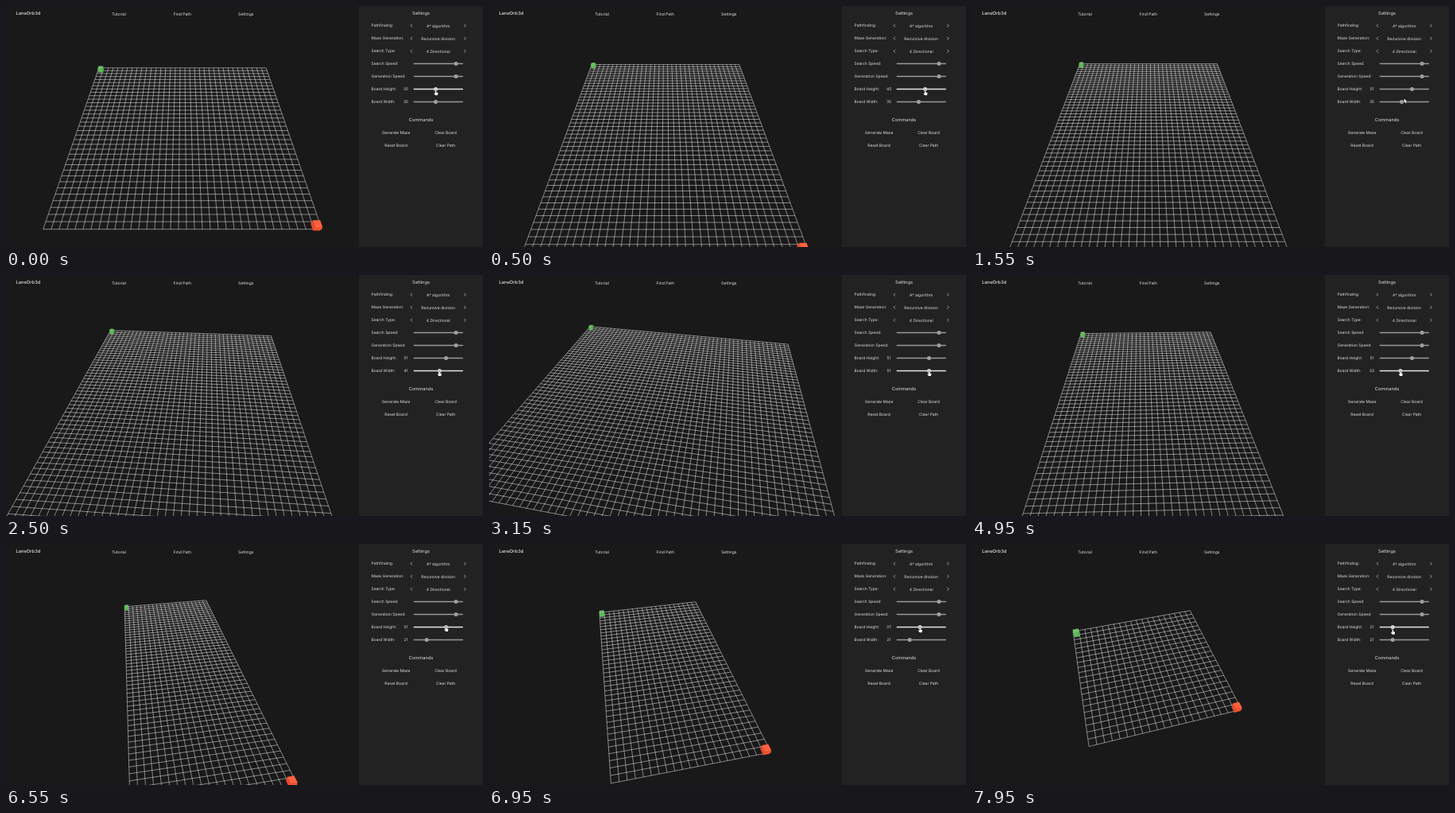
These frames come from a looping animation (600x303 px, 8 s). An HTML page with a canvas:

```html
<!DOCTYPE html>
<html lang="en">
<head>
<meta charset="utf-8">
<title>Path board</title>
<style>
  html, body { margin: 0; width: 100%; height: 100%; overflow: hidden; background: #191919; }
  canvas { display: block; width: 600px; height: 303px; }
</style>
</head>
<body>
<canvas id="stage"></canvas>
<script>
const LOOP = 8000, STEP = 50;
const STAGE = { w: 600, h: 303 }, PANEL_X = 444;
const VIEW = { x: 222, y: 153.9, focalX: 366, focalY: 368.5 };
const EYE_HEIGHT = 35;

// Keyframes: [time, value...]
const HEIGHT_KEYS = [[0, 35], [800, 51], [6550, 51], [6950, 37], [7350, 31], [7900, 21]];
const WIDTH_KEYS = [[2200, 35], [3050, 50.4], [3150, 51], [4400, 51], [4950, 33], [5250, 25], [5650, 21]];
const MOVES = [
  [[1200, 553, 105], [1550, 543.6, 116.4], [1800, 540.5, 120.4]],
  [[5800, 529, 120.4], [6100, 543, 112], [6300, 552, 103.4]]
];

const canvas = document.getElementById('stage');
const ctx = canvas.getContext('2d');
const dpr = window.devicePixelRatio || 1;
canvas.width = STAGE.w * dpr;
canvas.height = STAGE.h * dpr;

function sample(keys, t) {
  if (t <= keys[0][0]) return keys[0].slice(1);
  for (let i = 1; i < keys.length; i++) {
    const a = keys[i - 1], b = keys[i];
    if (t <= b[0]) {
      const k = (t - a[0]) / (b[0] - a[0]);
      return a.slice(1).map((v, j) => v + (b[j + 1] - v) * k);
    }
  }
  return keys[keys.length - 1].slice(1);
}

const odd = v => Math.round((v - 1) / 2) * 2 + 1;
const knobX = v => 540.5 + (v - 35) * 0.8125;

// The camera looks at the board's centre from above its near side.
function makeCamera(cols, rows) {
  const ex = (cols - 35) / 2, ez = rows / 2 + 16.4;
  const dist = Math.hypot(ex, ez), range = Math.hypot(dist, EYE_HEIGHT);
  const fx = -ex / dist, fz = -ez / dist;
  const cos = dist / range, sin = EYE_HEIGHT / range;
  return (x, y, z) => {
    const dx = x - ex, dy = y - EYE_HEIGHT, dz = z - ez;
    const ahead = dx * fx + dz * fz, side = -dx * fz + dz * fx;
    const depth = ahead * cos - dy * sin, up = ahead * sin + dy * cos;
    return [VIEW.x + side * VIEW.focalX / depth, VIEW.y - up * VIEW.focalY / depth];
  };
}

function drawGrid(project, cols, rows) {
  const hx = cols / 2, hz = rows / 2;
  ctx.beginPath();
  for (let i = 0; i <= cols; i++) {
    ctx.moveTo(...project(i - hx, 0, -hz));
    ctx.lineTo(...project(i - hx, 0, hz));
  }
  for (let j = 0; j <= rows; j++) {
    ctx.moveTo(...project(-hx, 0, j - hz));
    ctx.lineTo(...project(hx, 0, j - hz));
  }
  ctx.strokeStyle = 'rgba(255,255,255,0.76)';
  ctx.lineWidth = 0.62;
  ctx.stroke();
}

function drawCube(project, cx, cz, [top, front, side]) {
  const h = 0.45;
  const face = (color, corners) => {
    const p = corners.map(([x, y, z]) => project(cx + x * h, y * h, cz + z * h));
    const turn = (p[1][0] - p[0][0]) * (p[2][1] - p[0][1]) - (p[1][1] - p[0][1]) * (p[2][0] - p[0][0]);
    if (turn <= 0) return;
    ctx.beginPath();
    p.forEach(q => ctx.lineTo(...q));
    ctx.closePath();
    ctx.fillStyle = ctx.strokeStyle = color;
    ctx.lineWidth = 0.3;
    ctx.fill();
    ctx.stroke();
  };
  face(side, [[-1, 1, -1], [-1, 1, 1], [-1, -1, 1], [-1, -1, -1]]);
  face(side, [[1, 1, 1], [1, 1, -1], [1, -1, -1], [1, -1, 1]]);
  face(front, [[-1, 1, 1], [1, 1, 1], [1, -1, 1], [-1, -1, 1]]);
  face(top, [[-1, 1, -1], [1, 1, -1], [1, 1, 1], [-1, 1, 1]]);
}

// Small text is set large and scaled down evenly, so hinting does not distort it.
function label(text, x, y, size = 4.9, align = 'left', weight = 400) {
  const em = 100;
  ctx.save();
  ctx.translate(x, y + size * 0.365);
  ctx.scale(size / em, size / em);
  ctx.font = `${weight} ${em}px Inter, sans-serif`;
  ctx.textRendering = 'geometricPrecision';
  ctx.textAlign = align;
  ctx.fillStyle = '#e2e2e2';
  ctx.fillText(text, 0, 0);
  ctx.restore();
}

function chevron(x, y, dir) {
  ctx.beginPath();
  ctx.moveTo(x - dir, y - 2);
  ctx.lineTo(x + dir, y);
  ctx.lineTo(x - dir, y + 2);
  ctx.strokeStyle = '#dcdcdc';
  ctx.lineWidth = 0.65;
  ctx.stroke();
}

function slider(y, x, hot) {
  ctx.fillStyle = hot ? '#e2e2e2' : '#989898';
  ctx.beginPath();
  ctx.roundRect(512.5, y - 0.75, 62.5, 1.5, 0.75);
  ctx.fill();
  ctx.fillStyle = hot ? '#d8d8d8' : '#a0a0a0';
  ctx.beginPath();
  ctx.arc(x, y, 2.5, 0, Math.PI * 2);
  ctx.fill();
}

function drawPanel(cols, rows, hot) {
  ctx.fillStyle = '#222222';
  ctx.fillRect(PANEL_X, 0, STAGE.w - PANEL_X, STAGE.h);
  label('Settings', 522, 9, 5.65, 'center');
  const choices = [
    ['Pathfinding:', 'A* algorithm'],
    ['Maze Generation:', 'Recursive division'],
    ['Search Type:', '4 Directional']
  ];
  choices.forEach(([name, value], i) => {
    const y = 24.7 + i * 16;
    label(name, 459.5, y);
    label(value, 543.7, y, 5, 'center');
    chevron(510, y, -1);
    chevron(577.3, y, 1);
  });
  label('Search Speed:', 459.5, 72.6);
  label('Generation Speed:', 459.5, 88.6);
  label('Board Height:', 459.5, 104.6);
  label('Board Width:', 459.5, 120.6);
  label(String(rows), 503, 104.6, 4.9, 'center');
  label(String(cols), 503, 120.6, 4.9, 'center');
  slider(72.5, 566, false);
  slider(88.5, 566, false);
  slider(104.5, knobX(rows), hot === 'height');
  slider(120.5, knobX(cols), hot === 'width');
  label('Commands', 522, 143, 5.65, 'center');
  label('Generate Maze', 490.5, 158.8, 4.95, 'center');
  label('Clear Board', 553, 158.8, 4.95, 'center');
  label('Reset Board', 490.5, 174.8, 4.95, 'center');
  label('Clear Path', 553, 174.8, 4.95, 'center');
}

function drawPointer(x, y, hand) {
  ctx.save();
  ctx.translate(x, y);
  const shape = hand
    ? 'M-.7.6Q0-.3.7.6V3L2.8 3.6Q3.1 5 2.3 6.8H-.5L-2.2 4.5Q-2.1 3.5-.7 4.5Z'
    : 'M0 0V5.2L1.2 4.1L2.1 6.1L3 5.7L2.1 3.8H3.7Z';
  const path = new Path2D(shape);
  ctx.fillStyle = '#ffffff';
  ctx.strokeStyle = '#151515';
  ctx.lineWidth = 0.8;
  ctx.stroke(path);
  ctx.fill(path);
  ctx.restore();
}

function pointerState(t, cols, rows) {
  for (const move of MOVES) {
    const start = move[0][0], end = move[move.length - 1][0];
    if (t > start + 50 && t < end) {
      const [x, y] = sample(move, t);
      return { x, y, hand: false, hot: null };
    }
  }
  const onWidth = t >= 1800 && t < 6000;
  const x = knobX(onWidth ? cols : rows);
  const y = onWidth ? 120.2 : t < 1800 ? 105.4 : sample([[6550, 103.2], [6950, 104.4], [7950, 107]], t)[0];
  return { x, y, hand: true, hot: onWidth ? 'width' : 'height' };
}

function draw(t) {
  const rawRows = sample(HEIGHT_KEYS, t)[0], rawCols = sample(WIDTH_KEYS, t)[0];
  const rows = odd(rawRows), cols = odd(rawCols);
  const pointer = pointerState(t, rawCols, rawRows);
  const project = makeCamera(cols, rows);

  ctx.setTransform(dpr, 0, 0, dpr, 0, 0);
  ctx.fillStyle = '#191919';
  ctx.fillRect(0, 0, STAGE.w, STAGE.h);
  drawGrid(project, cols, rows);
  drawCube(project, 0.5 - cols / 2, 0.5 - rows / 2, ['#6fc46b', '#5dbb59', '#4fa54c']);
  drawCube(project, cols / 2 - 0.5, rows / 2 - 0.5, ['#ff6240', '#f4512f', '#e84a2a']);

  label('LaneOrb3d', 12.5, 9, 5.75, 'left', 500);
  label('Tutorial', 142, 10, 5.05, 'center');
  label('Find Path', 221.8, 10, 5.05, 'center');
  label('Settings', 301.7, 10, 5.05, 'center');
  drawPanel(cols, rows, pointer.hot);
  drawPointer(pointer.x, pointer.y, pointer.hand);
}

const origin = performance.now();
function tick() {
  const t = Math.max(0, performance.now() - origin) % LOOP;
  draw(Math.floor(t / STEP) * STEP);
  requestAnimationFrame(tick);
}
tick();
</script>
</body>
</html>
```
